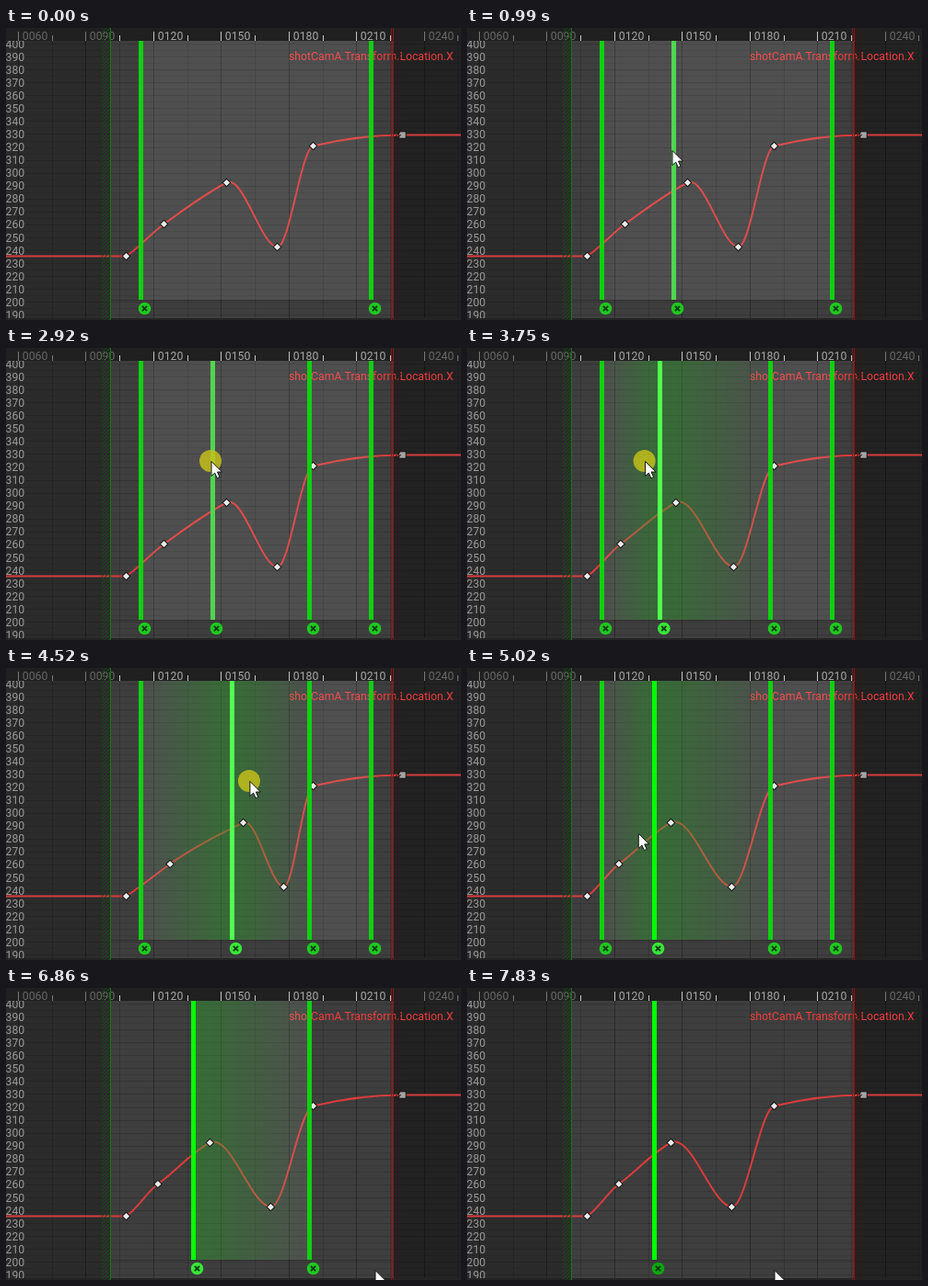
An HTML page with a canvas for the animation above (8000 ms loop, 494 px wide and 318 px high).

```html
<!DOCTYPE html>
<html lang="en">
<head>
<meta charset="utf-8">
<title>Curve editor retiming</title>
<style>
html, body { margin: 0; width: 494px; height: 318px; overflow: hidden; background: #2b2b2b; }
canvas { display: block; }
</style>
</head>
<body>
<canvas id="stage" width="494" height="318"></canvas>
<script>
const ctx = document.getElementById('stage').getContext('2d');
const LOOP = 8000, W = 494, H = 318, TOP = 14, BOTTOM = 296;
const STEP = 73.45, FIRST = 13.5, ROW = 14.07;
const FROM = 113, TO = 420;
const IN = 146.5, MID = 224.5, LAST = 329.5, OUT = 396.5;
const DRAG_START = 3430, DRAG_TIME = 1300, GRAB = 2950, DROP = 4930;

// Clicks: a bar is added or grabbed on its line, and cut on its button
const onLine = (bar, y, press, release) => ({ x: bar - 2, y, bar, press, release });
const onButton = (bar, press, release) => ({ x: bar + 4, y: 306, bar, press, release, cut: true });
const clicks = [
  onLine(MID, 132, 750, 990), onLine(LAST, 105, 1720, 1940), onLine(MID, 122, 2920, DROP),
  onButton(IN, 5500, 5730), onButton(OUT, 6680, 6860), onButton(LAST, 7630, 7830)
];
// x, y, slope
const keys = [[130, 248, -.65], [171, 213, -.72], [239, 168, -.5],
  [294, 238, .1], [333, 128, -.24], [430, 116, 0]];

const clamp = u => Math.min(1, Math.max(0, u));
const easeOut = u => 1 - (1 - u) ** 1.8;

// A growing swing: left, far right, then back to rest on the left
function dragAt(t) {
  const u = clamp((t - DRAG_START) / DRAG_TIME);
  return -21 * u - 57 * u ** 1.28 * Math.sin(2 * Math.PI * u);
}

function cursorAt(t, drag) {
  let x = 243, y = -22, free = 130;
  for (const c of clicks) {
    if (free === DROP) x += drag;
    const arrive = c.press - 80, travel = 420 + 1.8 * Math.hypot(c.x - x, c.y - y);
    const leave = Math.max(free, arrive - travel);
    if (t < leave) break;
    const u = easeOut(clamp((t - leave) / (arrive - leave)));
    x += (c.x - x) * u;
    y += (c.y - y) * u;
    if (u < 1) break;
    free = c.release;
  }
  return [t >= GRAB && t < DROP ? x + drag : x, y];
}

function isAlive(bar, t) {
  const own = clicks.filter(c => c.bar === bar), add = own.find(c => !c.cut), cut = own.find(c => c.cut);
  return (!add || t >= add.press) && (!cut || t < cut.press);
}

function rect(color, x, y, w, h) {
  ctx.fillStyle = color;
  ctx.fillRect(x, y, w, h);
}

function disc(color, x, y, r) {
  ctx.fillStyle = color;
  ctx.beginPath();
  ctx.arc(x, y, r, 0, 7);
  ctx.fill();
}

function text(str, x, y, color) {
  ctx.font = '12.24px Roboto, sans-serif';
  ctx.fillStyle = color;
  ctx.fillText(str, x, y);
}

function hatch(x, w, color) {
  ctx.save();
  ctx.beginPath();
  ctx.rect(x, 0, w, H);
  ctx.clip();
  ctx.strokeStyle = color;
  ctx.lineWidth = 1;
  ctx.beginPath();
  for (let y = -12; y < H + 12; y += 4) {
    ctx.moveTo(x, y + w);
    ctx.lineTo(x + w, y);
  }
  ctx.stroke();
  ctx.restore();
}

function drawGrid() {
  rect('#2b2b2b', 0, 0, FROM, H);
  rect('#3e3e3e', FROM, 0, TO - FROM, H);
  rect('#222', TO, 0, W - TO, H);
  for (let i = 0; i < 14; i++)
    rect(`rgba(0,0,0,${i % 2 ? .14 : .32})`, Math.round(FIRST + i * STEP / 2 - .5), TOP, 1, H);
  for (let i = 0; i < 44; i++)
    rect(`rgba(0,0,0,${i % 2 ? .08 : .15})`, 0, Math.round(17 + i * ROW / 2), W, 1);
  for (let i = 0; i < 22; i++) text(400 - i * 10, -.5, 21.5 + i * ROW, '#999');
}

function drawHeader() {
  rect('#202020', 0, 0, W, TOP);
  for (let i = 0; i < 14; i++) {
    const x = Math.round(FIRST + i * STEP / 2 - .5), major = i % 2 === 0;
    const inside = x > FROM && x < TO;
    rect(inside ? '#c8c8c8' : '#777', x, major ? 4 : 8, 1, major ? 10 : 6);
    if (major) text(String(60 + i * 15).padStart(4, '0'), x + 4.8, 12.5, inside ? '#a8a8a8' : '#686868');
  }
  hatch(FROM - 9, 9, '#174d17');
  rect('#1d701d', FROM, 0, 1, H);
  hatch(TO, 9, '#3c1616');
  rect('#7c1c1c', TO - 2, 0, 1, H);
  rect('#7c1c1c', TO, 0, 1, H);
}

function drawCurve(points) {
  ctx.save();
  ctx.translate(.5, .5);
  ctx.beginPath();
  ctx.moveTo(-1, points[0][1]);
  ctx.lineTo(...points[0]);
  for (let i = 1; i < points.length; i++) {
    const [x0, y0] = points[i - 1], [x1, y1] = points[i], h = (x1 - x0) / 3;
    ctx.bezierCurveTo(x0 + h, y0 + keys[i - 1][2] * h, x1 - h, y1 - keys[i][2] * h, x1, y1);
  }
  ctx.lineTo(W, points[5][1]);
  ctx.strokeStyle = '#d83c3c';
  ctx.lineWidth = 2;
  ctx.stroke();
  ctx.restore();
}

function drawKeys(points) {
  points.forEach(([x, y], i) => {
    const diamond = i < 5, r = diamond ? 3.5 : 4.2;
    ctx.save();
    ctx.translate(x + .5, y + .5);
    if (diamond) ctx.rotate(Math.PI / 4);
    rect('#181818', -r, -r, 2 * r, 2 * r);
    rect(diamond ? '#ececec' : '#a4a4a4', 1 - r, 1 - r, 2 * r - 2, 2 * r - 2);
    ctx.restore();
  });
}

function glow(from, to) {
  const g = ctx.createLinearGradient(from, 0, to, 0);
  g.addColorStop(0, 'rgba(20,150,20,.42)');
  g.addColorStop(1, 'rgba(20,150,20,0)');
  rect(g, Math.min(from, to), TOP, Math.abs(to - from), BOTTOM - TOP);
}

function drawButton(x, color) {
  disc(color, x, 305.5, 6.8);
  ctx.strokeStyle = '#123c12';
  ctx.lineWidth = 2;
  ctx.beginPath();
  for (const s of [-1, 1]) {
    ctx.moveTo(x - 2.6, 305.5 - 2.6 * s);
    ctx.lineTo(x + 2.6, 305.5 + 2.6 * s);
  }
  ctx.stroke();
}

function drawCursor(x, y) {
  ctx.beginPath();
  [[0, 0], [0, 16], [3.7, 12.6], [6.2, 18.3], [9, 17], [6.5, 11.5], [11.5, 11.5]]
    .forEach(([dx, dy]) => ctx.lineTo(x + dx, y + dy));
  ctx.closePath();
  ctx.fillStyle = '#fff';
  ctx.fill();
  ctx.strokeStyle = '#111';
  ctx.lineWidth = 1;
  ctx.stroke();
}

function draw(t) {
  const drag = dragAt(t), [cx, cy] = cursorAt(t, drag);
  const selected = t >= GRAB, dragging = selected && t < DROP;
  const mid = MID + drag;
  const bars = [IN, MID, LAST, OUT].filter(b => isAlive(b, t)).map(b => b === MID ? mid : b);
  // Keys between the outer bars follow the dragged bar by distance
  const points = keys.map(([x, y]) => {
    const weight = x < MID ? (x - IN) / (MID - IN) : (LAST - x) / (LAST - MID);
    return [x + drag * Math.max(0, weight), y];
  });

  drawGrid();
  drawCurve(points);
  text('shotCamA.Transform.Location.X', 307, 35, '#f03c3c');

  const left = bars[0], right = bars[bars.length - 1];
  rect('rgba(255,255,255,.085)', left, TOP, right - left, BOTTOM - TOP);
  if (selected && right > mid) {
    if (left < mid) glow(mid, left);
    glow(mid, LAST);
  }
  drawKeys(points);
  rect('rgba(0,0,0,.2)', FROM, BOTTOM, TO - FROM, 1);
  rect('#242424', 0, 316, W, 2);
  drawHeader();

  for (const x of bars) {
    const active = selected && x === mid;
    const hover = Math.abs(cx - x) < 6 && cy > TOP && cy < BOTTOM;
    const color = active ? (dragging ? '#50ff50' : '#00ff00') : hover ? '#50d650' : '#10d010';
    rect(color, Math.round(x - 2.5), TOP, 5, BOTTOM - TOP);
    const lone = bars.length === 1;
    drawButton(x + 4, lone ? '#0aa80a' : active ? '#38e638' : '#1fc81f');
  }

  if (clicks.some(c => t >= c.press && t < c.release))
    disc('rgba(200,194,24,.82)', cx - .5, cy + 1, 12);
  drawCursor(cx + .5, cy + 1.5);
}

const start = performance.now();
function frame() {
  draw((performance.now() - start) % LOOP);
  requestAnimationFrame(frame);
}
frame();
</script>
</body>
</html>
```
